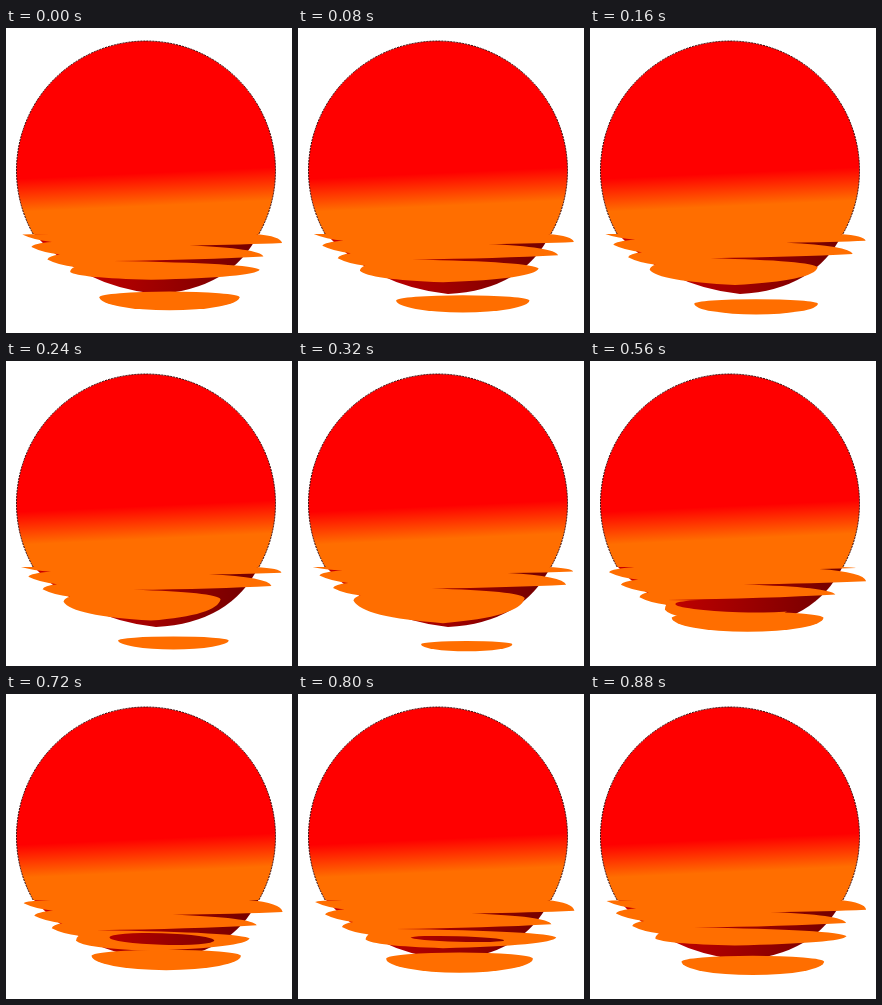
An HTML page with a canvas for the animation above (920 ms loop, 286 by 305 pixels).

```html
<!DOCTYPE html>
<html>
<head>
<meta charset="utf-8">
<title>Setting sun</title>
<style>
html, body { margin: 0; overflow: hidden; background: #fff; }
canvas { display: block; }
</style>
</head>
<body>
<canvas id="stage" width="286" height="305"></canvas>
<script>
const ctx = document.getElementById('stage').getContext('2d');
const LOOP = 920, STEP = 40, BIRTH = 400;
const CX = 140, CY = 142.5, R = 129.5, HORIZON = 206;

function gradient(x0, y0, x1, y1, from, to) {
  const g = ctx.createLinearGradient(x0, y0, x1, y1);
  g.addColorStop(0, from);
  g.addColorStop(1, to);
  return g;
}
const sunFill = gradient(CX, 145, CX + 1.5, 178, '#f00', '#ff6e00');
const shadowFill = gradient(80, 0, 250, 12, '#c80000', '#780000');

// Reach of a ripple to the right: [age in loops, x]
const reach = [
  [0, 190], [0.2, 200], [0.4, 259], [0.55, 256], [0.83, 214],
  [1, 240], [2.2, 277], [3, 275], [3.4, 254], [4, 254]
];

function sample(keys, age) {
  const i = keys.findIndex(key => key[0] > age);
  const [t0, v0] = keys[i - 1], [t1, v1] = keys[i];
  return v0 + (v1 - v0) * (age - t0) / (t1 - t0);
}

// Height falling steadily to the horizon, reached at the given age.
const climb = (age, speed, end) => HORIZON + speed * Math.max(0, end - age);

// A ripple is born low, opens quickly and climbs to the horizon in four loops.
function ripple(age) {
  const leftX = 80 - 30 * age + 3.4 * age * age;
  const leftY = climb(age, 12.5, 3.6);
  const opening = 118 * Math.max(0, 1 - age / 0.16);
  return {
    rightTip: [sample(reach, age), climb(age, 13.3, 3.25)],
    rightNotch: [Math.min(250, 64 + 76 * age + opening), climb(age, 15.5, 2.3)],
    leftTip: [leftX, leftY],
    leftNotch: [leftX + 8 * age, Math.max(HORIZON, leftY - 5)]
  };
}

function curve(tip, notch, end, bulge) {
  const x = notch[0] + (tip[0] - notch[0]) * bulge;
  const y = notch[1] + (tip[1] - notch[1]) * 0.25;
  ctx.quadraticCurveTo(x, y, ...end);
}

function fill(style) {
  ctx.fillStyle = style;
  ctx.fill();
}

function drawShadow() {
  ctx.beginPath();
  ctx.moveTo(27, HORIZON - 1);
  ctx.quadraticCurveTo(75, 258, 150, 266);
  ctx.quadraticCurveTo(225, 262, 253, HORIZON - 1);
  fill(shadowFill);
}

function drawSun() {
  const a = Math.asin((HORIZON - CY) / R);
  ctx.beginPath();
  ctx.arc(CX, CY, R, Math.PI - a, a);
  fill(sunFill);
  ctx.setLineDash([2, 1]);
  ctx.strokeStyle = '#300000';
  ctx.stroke();
}

function drawBody(phase) {
  const ripples = [3, 2, 1, 0].map(k => ripple(phase + k));
  const bottom = [145, 251 + 30 * Math.abs(phase - 0.54)];
  ctx.beginPath();
  ctx.moveTo(27, HORIZON - 1);
  ctx.lineTo(253, HORIZON - 1);
  ctx.lineTo(...ripples[0].rightNotch);
  ripples.forEach((r, i) => {
    const next = i < 3 ? ripples[i + 1].rightNotch : bottom;
    curve(r.rightTip, r.rightNotch, r.rightTip, 0.95);
    curve(r.rightTip, next, next, i < 3 ? 0.6 : 0.95);
  });
  let last = bottom;
  for (const r of ripples.reverse()) {
    curve(r.leftTip, last, r.leftTip, last === bottom ? 0.9 : 0.6);
    curve(r.leftTip, r.leftNotch, r.leftNotch, 0.9);
    last = r.leftNotch;
  }
  ctx.closePath();
  fill(sunFill);
}

// The lowest lobe breaks off, sinks and shrinks away.
function drawSinker(age) {
  const left = 1 - (age / 1.06) ** 3;
  if (left <= 0) return;
  const x = 155 + 15 * age, rx = 76 * Math.sqrt(left);
  const top = 247 + 18 * age + 20 * age * age;
  const h = 265 + 35 * age - 8 * age * age - top;
  const y = top + 0.3 * h;
  ctx.beginPath();
  ctx.ellipse(x, y, rx, 0.3 * h, 0, Math.PI, 2 * Math.PI);
  ctx.ellipse(x, y, rx, 0.7 * h, 0, 0, Math.PI);
  fill(sunFill);
}

// Dark gap that opens above the newest lobe.
function drawPocket(phase) {
  const size = Math.sin(2 * Math.PI * phase);
  if (size <= 0) return;
  ctx.beginPath();
  ctx.ellipse(142 + 40 * phase, 245, 75 - 65 * phase, 7 * size, 0.03, 0, 2 * Math.PI);
  fill(shadowFill);
}

function draw(now) {
  const t = Math.floor((now % LOOP) / STEP) * STEP;
  const phase = (t - BIRTH + LOOP) % LOOP / LOOP;
  ctx.clearRect(0, 0, 286, 305);
  drawShadow();
  drawSun();
  drawBody(phase);
  drawSinker(phase);
  drawSinker(phase + 1);
  drawPocket(phase);
}

const start = performance.now();
function tick() {
  draw(performance.now() - start);
  requestAnimationFrame(tick);
}
tick();
</script>
</body>
</html>
```
